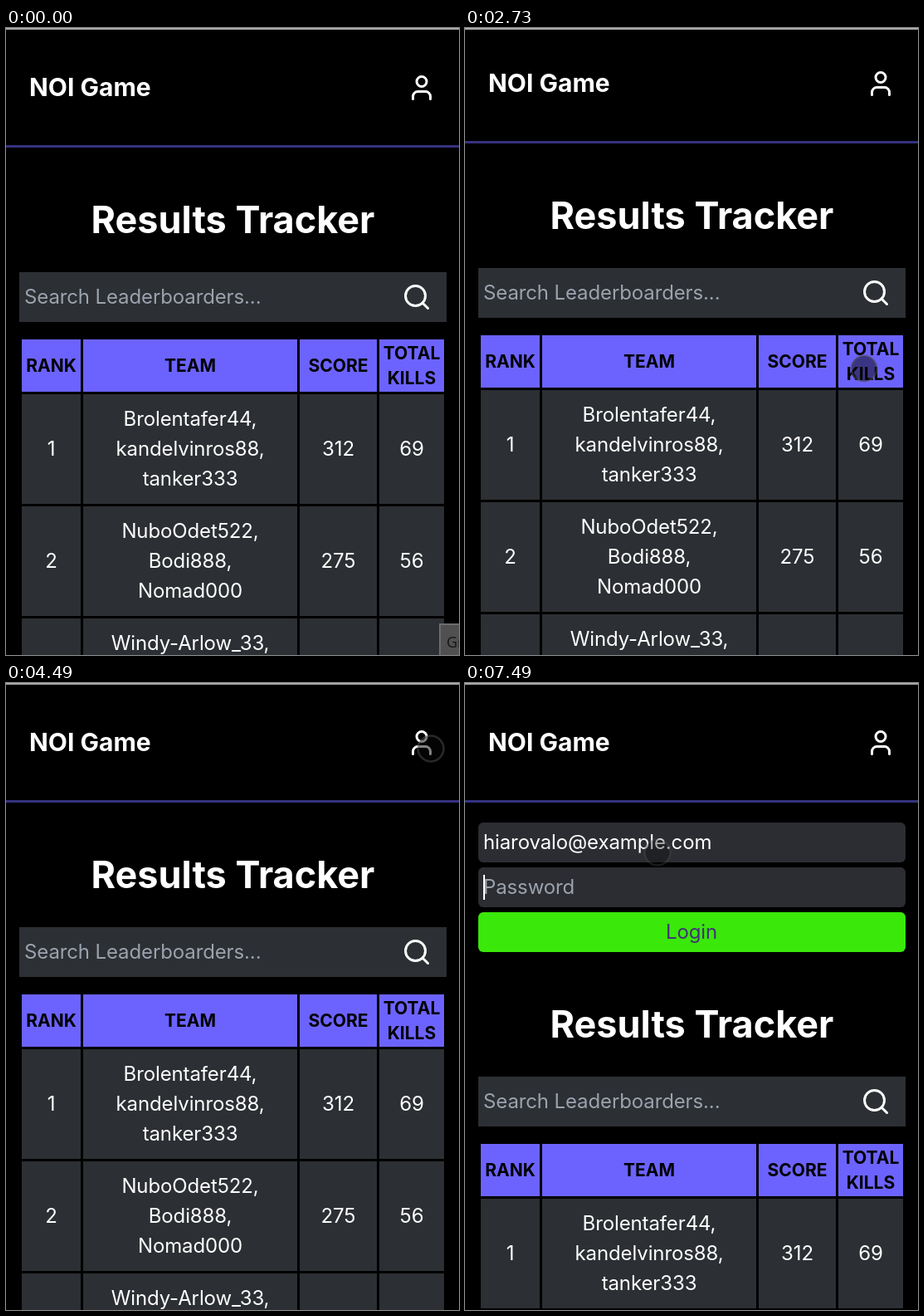
An HTML page that plays this animation: 546 px wide and 755 px high, repeating every 8 s.

```html
<!DOCTYPE html>
<html lang="en">
<head>
<meta charset="utf-8">
<title>Results Tracker</title>
<style>
  html, body { margin: 0; width: 100%; height: 100%; overflow: hidden; background: #000; }
  svg { display: block; width: 546px; height: 755px; }
  text {
    font-family: Inter, "Open Sans", sans-serif; font-optical-sizing: none;
    letter-spacing: -.005em; white-space: pre;
  }
  text[font-weight="700"] { letter-spacing: 0; }
  .icon { fill: none; stroke: #fff; stroke-width: 2; stroke-linecap: round; stroke-linejoin: round; }
</style>
</head>
<body>
<svg id="stage" viewBox="0 0 546 755" xmlns="http://www.w3.org/2000/svg"></svg>
<script>
const LOOP = 8000, TICK = 250, LEAD = 30;
const stage = document.getElementById('stage');

function add(parent, tag, attrs, content) {
  const el = document.createElementNS('http://www.w3.org/2000/svg', tag);
  for (const k in attrs) el.setAttribute(k, attrs[k]);
  if (content) el.textContent = content;
  return parent.appendChild(el);
}
const group = parent => add(parent, 'g', {});
const box = (parent, x, y, width, height, fill, rx = 0) =>
  add(parent, 'rect', { x, y, width, height, fill, rx });

// y is the middle of the capital letters
function label(parent, str, x, y, { size = 24, weight = 400, fill = '#fff', anchor = 'middle' } = {}) {
  return add(parent, 'text', {
    x, y: Math.floor(y + size * 0.3636), fill,
    'font-size': size, 'font-weight': weight, 'text-anchor': anchor
  }, str);
}
function icon(parent, x, y, [cx, cy, r], path) {
  const g = add(parent, 'g', { class: 'icon', transform: `translate(${x} ${y}) scale(1.5)` });
  add(g, 'circle', { cx, cy, r });
  add(g, 'path', { d: path });
}
const show = (el, on) => el.setAttribute('visibility', on ? 'visible' : 'hidden');
const move = (el, x, y) => el.setAttribute('transform', `translate(${x} ${y})`);

const CELL = '#2c2f33', FIELD = '#2c2d32', GREEN = '#3ae80a', PURPLE = '#6c63ff';
const hint = { anchor: 'start', fill: '#9ca3af' };

const page = group(stage);

// Header
label(page, 'NOI Game', 28, 72, { size: 30, weight: 700, anchor: 'start' });
icon(page, 483, 54, [12, 7, 4], 'M19 21v-2a4 4 0 0 0-4-4H9a4 4 0 0 0-4 4v2');
box(page, 0, 141, 546, 3, '#363280');

// Login form
const form = group(page);
[FIELD, FIELD, GREEN].forEach((fill, i) => box(form, 16, 168 + i * 54, 515, 48, fill, 6));
const emailHint = label(form, 'Email', 22, 192, hint);
const email = label(form, 'hiarovalo@example.com', 22, 192, { anchor: 'start' });
label(form, 'Password', 22, 246, hint);
label(form, 'Login', 273, 300, { fill: '#433178' });
const caret = box(form, 0, 0, 2, 30, '#fff');

// Results
const results = group(page);
label(results, 'Results Tracker', 273.5, 231, { size: 45, weight: 700 });
box(results, 16, 294, 515, 60, CELL);
label(results, 'Search Leaderboarders...', 22, 324, hint);
icon(results, 477, 306, [11, 11, 8], 'M21 21l-4.35-4.35');

const GAP = 3, ROW = 132;
const widths = [71, 258, 93, 78];
const heads = ['RANK', 'TEAM', 'SCORE', 'TOTAL KILLS'];
const rows = [
  [['Brolentafer44,', 'kandelvinros88,', 'tanker333'], 312, 69],
  [['NuboOdet522,', 'Bodi888,', 'Nomad000'], 275, 56],
  [['Windy-Arlow_33,', 'Nobras446, El-', 'Ezu-334'], 240, 66],
  [['sundapomer222,', 'dbkhpndhvg7666', ''], 230, 89]
];
function tableRow(y, h, fill, cells, step, style) {
  let x = 19;
  cells.forEach((lines, i) => {
    box(results, x, y, widths[i], h, fill);
    lines.forEach((s, n) =>
      label(results, s, x + widths[i] / 2, y + h / 2 + (n - (lines.length - 1) / 2) * step, style));
    x += widths[i] + GAP;
  });
}
tableRow(375, 63, PURPLE, heads.map(s => s.split(' ')), 30, { size: 21, weight: 700, fill: '#000' });
rows.forEach(([team, score, kills], i) =>
  tableRow(441 + i * (ROW + GAP), ROW, CELL, [[i + 1], team, [score], [kills]], 36));

// Window edge, tooltip corner and pointer
box(stage, 0, 0, 546, 3, '#0c0f0d');
box(stage, 0, 0, 546, 2, '#a8a8a8');

const tip = group(stage);
box(tip, 522, 717, 30, 45, '#6c6c6c');
box(tip, 524, 719, 30, 45, '#505050');
label(tip, 'Gr', 531, 740, { size: 18, fill: '#161616', anchor: 'start' })
  .style.fontFamily = '"Open Sans", sans-serif';

const pointer = group(stage);
const ring = add(pointer, 'circle', {
  r: 15.5, fill: 'rgba(8,8,8,.5)', stroke: 'rgba(90,90,90,.45)', 'stroke-width': 2.5
});
const press = add(pointer, 'circle', { r: 18, fill: 'rgba(176,170,15,.75)' });

// All motion is sampled on quarter-second ticks
const stops = [
  [1, 529, 640], [6, 503, 74], [9, 503, 74], [11, 481, 410], [15, 469, 500],
  [18, 512, 79], [20, 512, 79], [21, 232, 204]
];
const toggles = [6, 9, 19];
const FOCUS = 23, PASTE = 26, NEXT = 30;

function ease(from, to, n) {
  const k = Math.min(1, Math.max(0, (n - from) / (to - from)));
  return k * k * (3 - 2 * k);
}
function pointerAt(n) {
  let [, x, y] = stops[0];
  for (let i = 1; i < stops.length; i++) {
    const k = ease(stops[i - 1][0], stops[i][0], n);
    x += k * (stops[i][1] - stops[i - 1][1]);
    y += k * (stops[i][2] - stops[i - 1][2]);
  }
  return [Math.round(x), Math.round(y)];
}
const scrollAt = n => Math.round(180 * (ease(10.78, 13, n) - ease(14.42, 17, n)));

function draw(t) {
  const n = Math.floor((t + LEAD) / TICK);
  const down = n === FOCUS || toggles.includes(n);
  move(pointer, ...pointerAt(n));
  show(ring, n > 0 && !down);
  show(press, down);
  ring.setAttribute('opacity', n < NEXT - 1 ? 1 : 0.65);
  show(tip, n < 1);

  const open = toggles.filter(k => k < n).length % 2;
  form.setAttribute('display', open ? 'inline' : 'none');
  move(results, 0, open * 180);
  move(page, 0, -scrollAt(n));

  const typed = n >= PASTE;
  show(email, typed);
  show(emailHint, !typed);
  const blinkOn = !typed || n >= NEXT || (n - PASTE + 1) % 4 < 2;
  show(caret, n >= FOCUS && blinkOn);
  move(caret, typed && n < NEXT ? 297 : 22, n < NEXT ? 178 : 231);
}

const start = performance.now();
function frame() {
  draw((performance.now() - start) % LOOP);
  requestAnimationFrame(frame);
}
frame();
</script>
</body>
</html>
```
